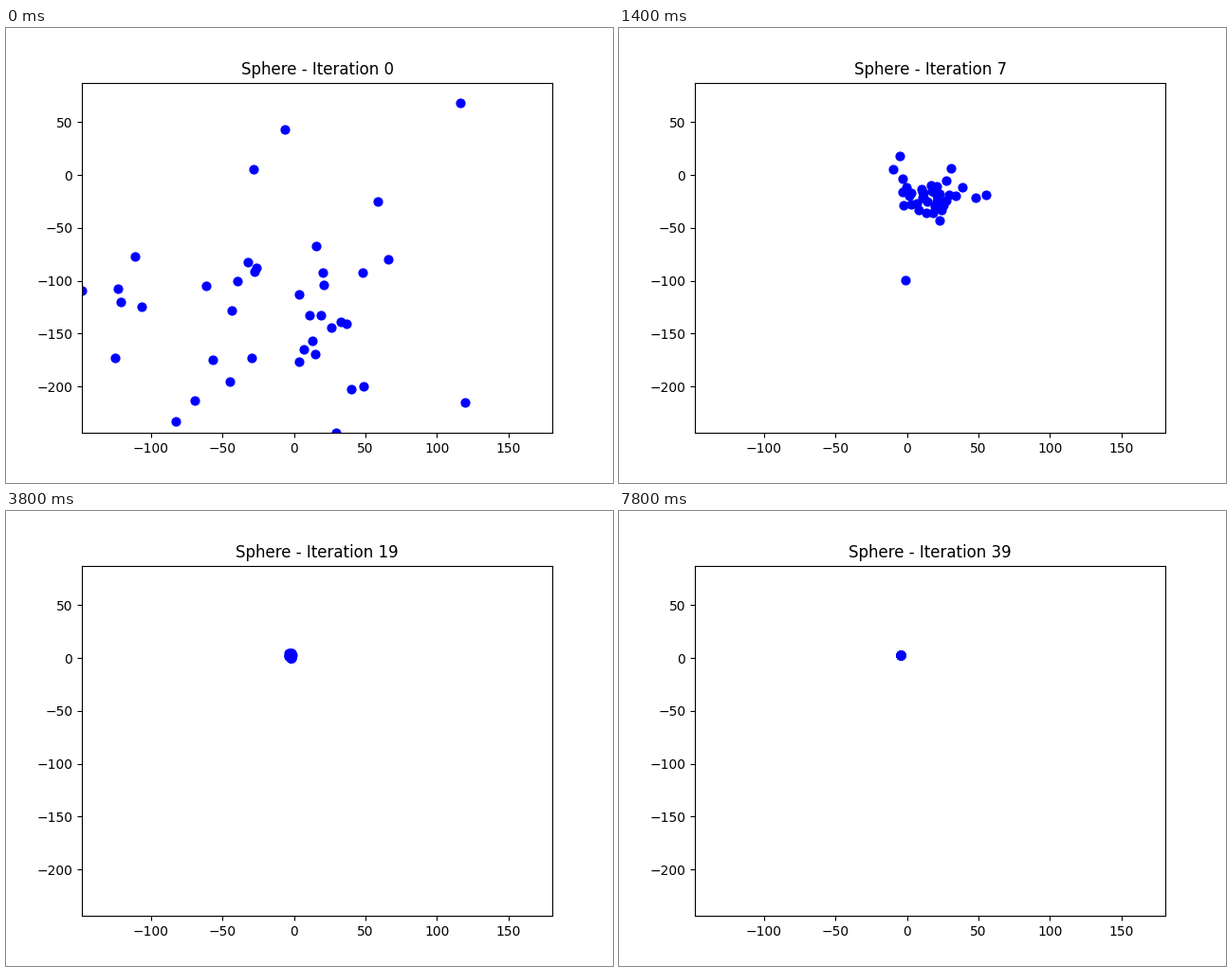
Animation, 640 px wide and 480 px high, one loop 8 s. Source, as a matplotlib script:

```python
import numpy as np
import matplotlib.pyplot as plt
from matplotlib.animation import FuncAnimation

FRAMES, INTERVAL, COUNT = 40, 200, 40
rng = np.random.default_rng(11)


def scatter_pose(center, spread, *outliers):
    """Clipped normal cloud whose first particles sit on the given outliers."""
    cloud = np.clip(rng.normal(size=(COUNT, 2)), -1.8, 1.8)
    points = np.array(center) + cloud * spread
    if outliers:
        points[:len(outliers)] = outliers
    return points


# The swarm swings past the optimum, then contracts onto it
keys = {
    0: scatter_pose((-17, -127), (60, 57), (116.3, 68.3), (-6.3, 43.2),
                    (-28.2, 5.5), (119.7, -215), (-148.2, -109.5),
                    (29.3, -244), (-82.5, -233)),
    3: scatter_pose((60, 16), (25, 24), (-14, 62), (4, -4.5), (122, 26),
                    (117, 0), (90, -29)),
    7: scatter_pose((17, -20), (13, 9), (-1, -99.5), (-5, 18), (-10, 5.5),
                    (31, 6), (55.5, -19), (48, -21.5), (23, -43)),
    11: scatter_pose((-4.5, -4), (4.2, 4.5), (-19.5, -4), (2.5, 11.5),
                     (-1.5, -17)),
    15: scatter_pose((-3, 0.5), (2, 2)),
    19: scatter_pose((-2.5, 2), (0.65, 1.3)),
    23: scatter_pose((-3.7, 2.4), (0.2, 0.2)),
    27: scatter_pose((-4.1, 2.5), (0, 0)),
    39: scatter_pose((-4.2, 2.5), (0, 0)),
}
times = np.array(list(keys))
poses = np.array(list(keys.values()))
slopes = np.gradient(poses, times, axis=0)


def swarm(t):
    """Cubic Hermite path through the poses."""
    i = min(np.searchsorted(times, t, side="right") - 1, len(times) - 2)
    h = times[i + 1] - times[i]
    u = (t - times[i]) / h
    ease = u * u * (3 - 2 * u)
    return ((1 - ease) * poses[i] + ease * poses[i + 1]
            + h * u * (1 - u) ** 2 * slopes[i]
            - h * u * u * (1 - u) * slopes[i + 1])


fig, ax = plt.subplots(figsize=(6.4, 4.8), dpi=100)
ax.set_xlim(-148.4, 180.7)
ax.set_ylim(-244, 87.4)
dots = ax.scatter(*swarm(0).T, s=40, c="b")
title = ax.set_title("Sphere - Iteration 0")


def update(n):
    dots.set_offsets(swarm(n))
    title.set_text(f"Sphere - Iteration {n}")
    return dots, title


anim = FuncAnimation(fig, update, frames=FRAMES, interval=INTERVAL, repeat=True)
plt.show()
```
